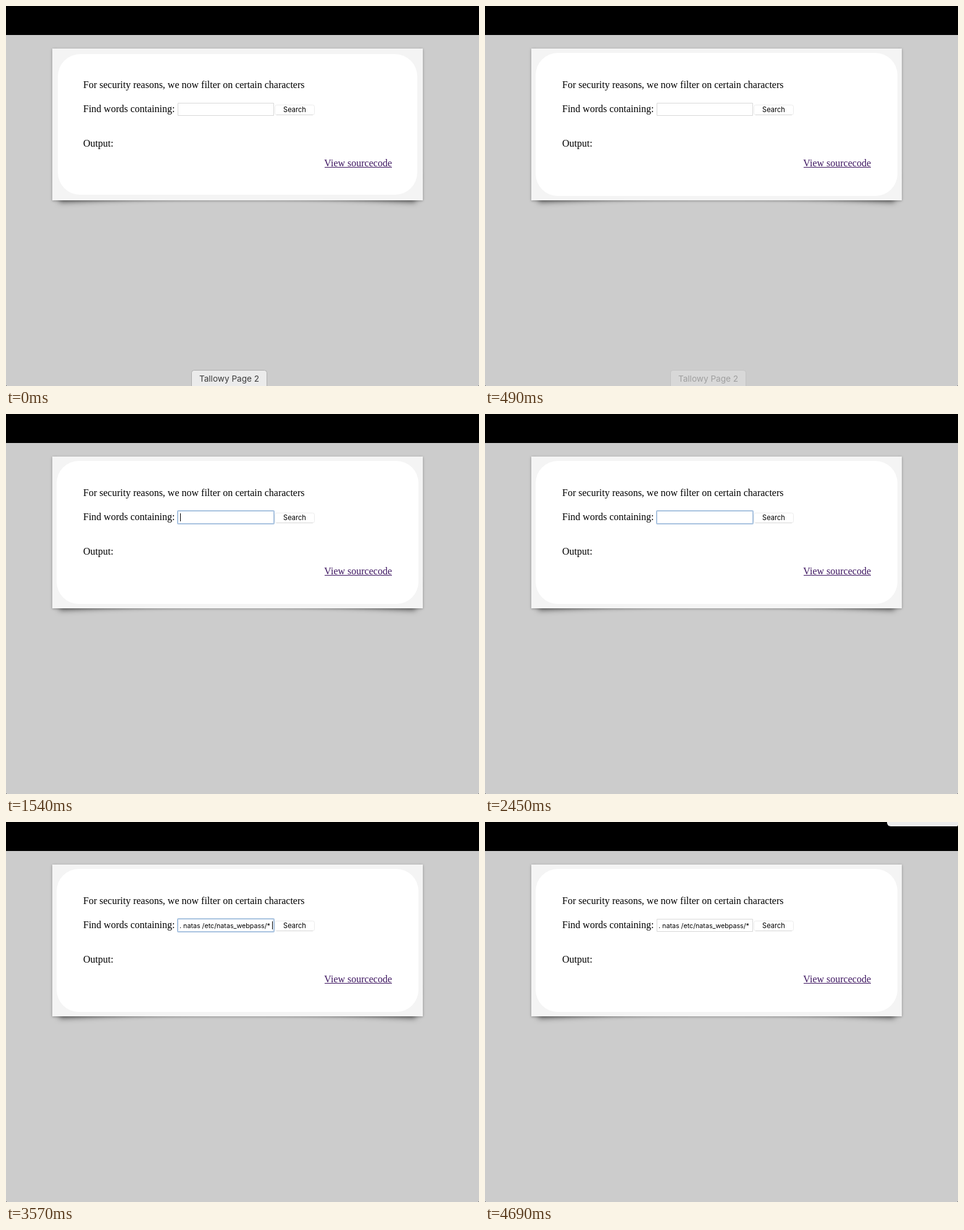
Write an HTML page with a canvas that moves like this. It is 766x616 px and loops after 8 s.

```html
<!DOCTYPE html>
<html lang="en">
<head>
<meta charset="utf-8">
<title>Word search</title>
<style>
  html, body { margin: 0; width: 100%; height: 100%; overflow: hidden; background: #ccc; }
  canvas { display: block; }
</style>
</head>
<body>
<canvas id="stage" width="766" height="616"></canvas>
<script>
const ctx = document.getElementById('stage').getContext('2d');
const LOOP = 8000, STEP = 70;
const SERIF = '16px "Liberation Serif", serif';
const sans = size => `${size}px Inter, sans-serif`;

// Caret opacity as [time, value] pairs
const CARET = [
  [1190, 0], [1330, 1], [1680, 1], [1890, 0], [2030, 0], [2240, 1], [2310, 1],
  [2450, 0], [2520, 0], [2730, 1], [3150, 1], [3290, 0], [3360, 0], [3570, 1],
  [3710, 1], [3850, 0], [3990, 0], [4200, 1]
];
const PASTE = 2800, BLUR = 4340;

const clamp = v => Math.max(0, Math.min(1, v));

function valueAt(keys, t) {
  if (t <= keys[0][0]) return keys[0][1];
  for (let i = 1; i < keys.length; i++) {
    const [t0, v0] = keys[i - 1], [t1, v1] = keys[i];
    if (t <= t1) return v0 + (v1 - v0) * (t - t0) / (t1 - t0);
  }
  return keys[keys.length - 1][1];
}

function box(x, y, w, h, r, fill, stroke, line = 1) {
  ctx.beginPath();
  ctx.roundRect(x, y, w, h, r);
  if (fill) { ctx.fillStyle = fill; ctx.fill(); }
  if (stroke) { ctx.strokeStyle = stroke; ctx.lineWidth = line; ctx.stroke(); }
}

function text(str, x, y, font, color = '#000', align = 'left') {
  ctx.font = font;
  ctx.fillStyle = color;
  ctx.textAlign = align;
  ctx.fillText(str, x, y);
}

function faded(alpha, draw) {
  if (alpha <= 0) return;
  ctx.save();
  ctx.globalAlpha = alpha;
  draw();
  ctx.restore();
}

// Only the shadow of a tilted slab shows; the slab itself lies off stage
function cornerShadow(cx, degrees) {
  ctx.save();
  ctx.shadowColor = 'rgba(0,0,0,0.55)';
  ctx.shadowBlur = 10;
  ctx.shadowOffsetX = 2000;
  ctx.shadowOffsetY = 10.5;
  ctx.translate(cx - 2000, 275.4);
  ctx.rotate(degrees * Math.PI / 180);
  ctx.fillStyle = '#000';
  ctx.fillRect(-150, -24.6, 300, 49.2);
  ctx.restore();
}

function drawCard(t) {
  cornerShadow(235, -3);
  cornerShadow(515, 3);
  ctx.save();
  ctx.shadowColor = 'rgba(0,0,0,0.3)';
  ctx.shadowBlur = 4;
  ctx.shadowOffsetY = 1;
  box(75, 69, 600, 246, 0, '#f4f4f4');
  ctx.restore();
  const inset = t < 140 ? 9 : 7;
  box(75 + inset, 69 + inset, 600 - 2 * inset, 246 - 2 * inset, 36, '#fff');

  text('For security reasons, we now filter on certain characters', 125, 133, SERIF);
  text('Find words containing:', 125, 172, SERIF);
  text('Output:', 125, 228, SERIF);
  text('View sourcecode', 625, 260, SERIF, '#3d1560', 'right');
  ctx.fillStyle = '#3d1560';
  ctx.fillRect(516, 261, 109, 1);
}

function drawForm(t) {
  box(435.5, 160.5, 64, 16, 3, '#fff', '#ececec');
  ctx.fillStyle = '#d6d6d6';
  ctx.fillRect(438, 176, 59, 1);
  text('Search', 467.5, 172, sans(11.1), '#000', 'center');

  box(278.5, 157.5, 155, 20, 0, '#fff', '#d8d8d8');
  const focused = t < BLUR;
  if (focused) {
    faded(clamp((t - 1120) / 210), () => box(278, 157, 156, 21, 1, null, '#a9c3e0', 2));
  }
  const pasted = t >= PASTE;
  if (pasted) text('. natas /etc/natas_webpass/*', 281, 172, sans(10.7));
  if (focused) {
    faded(valueAt(CARET, t), () => {
      ctx.fillStyle = '#000';
      ctx.fillRect(pasted ? 431 : 282, 161, 1, 13);
    });
  }
}

function drawDockLabel(t) {
  const k = clamp((t - 210) / 350);
  faded(1 - k * k, () => {
    box(300.5, 590.5, 122, 40, 4, '#ebebeb', '#adadad');
    text('Tallowy Page 2', 361.5, 609, sans(13.6), '#3a3a3a', 'center');
  });
}

function drawPanel(t) {
  if (t < 4550) return;
  const x = t < 4690 ? 654 : 651;
  box(x, -20, 766 - x, 27, [0, 0, 2, 6], '#ececec');
}

function draw(t) {
  ctx.fillStyle = '#ccc';
  ctx.fillRect(0, 0, 766, 616);
  ctx.fillStyle = '#000';
  ctx.fillRect(0, 0, 766, 47);
  drawCard(t);
  drawForm(t);
  drawDockLabel(t);
  drawPanel(t);
  ctx.fillStyle = '#555';
  ctx.fillRect(0, 615, 1, 1);
  ctx.fillRect(765, 615, 1, 1);
}

function tick() {
  const t = performance.now() % LOOP;
  draw(Math.floor(t / STEP) * STEP);
  requestAnimationFrame(tick);
}
tick();
</script>
</body>
</html>
```
